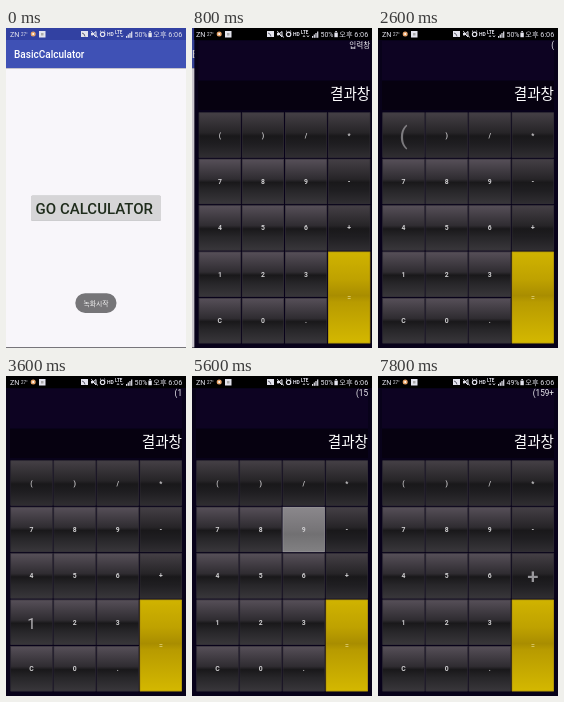
Recreate the animation shown at these times as an HTML page with a canvas. Size 180 by 320 pixels, loop 8000 ms.

```html
<!DOCTYPE html>
<html lang="ko">
<head>
<meta charset="utf-8">
<style>
html, body { margin: 0; width: 100%; height: 100%; overflow: hidden; background: #05020c; }
canvas { display: block; width: 100vw; height: 100vh; }
</style>
</head>
<body>
<canvas id="stage"></canvas>
<script>
const W = 180, H = 320, LOOP = 8000, STEP = 200;
const FONT = 'Roboto, "Noto Sans CJK KR", "Noto Sans CJK", sans-serif';
const canvas = document.getElementById('stage');
const ctx = canvas.getContext('2d');

const COL = 43.1, ROW = 46.4, LEFT = 4.5, TOP = 84.5;
const KEYS = ['()/*', '789-', '456+', '123=', 'C0.'];

// Each tap: key, press time, release time, input shown after release
const TAPS = [
  { key: '(', down: 1600, up: 2600, input: '(' },
  { key: '1', down: 3000, up: 3200, input: '(1', drop: 16 },
  { key: '5', down: 4400, up: 4800, input: '(15' },
  { key: '9', down: 5600, up: 6200, input: '(159', orbit: 15 },
  { key: '+', down: 7000, up: 7600, input: '(159+' }
];
const POP = 600;

function rect(x, y, w, h, fill) {
  ctx.fillStyle = fill;
  ctx.fillRect(x, y, w, h);
}

function pill(x, y, w, h, r, fill) {
  ctx.fillStyle = fill;
  ctx.beginPath();
  ctx.roundRect(x, y, w, h, r);
  ctx.fill();
}

function dot(x, y, r, fill) {
  ctx.fillStyle = fill;
  ctx.beginPath();
  ctx.arc(x, y, r, 0, 7);
  ctx.fill();
}

function line(points, color, width = 1) {
  ctx.strokeStyle = color;
  ctx.lineWidth = width;
  ctx.beginPath();
  points.forEach(([x, y]) => ctx.lineTo(x, y));
  ctx.stroke();
}

function text(str, x, y, size, color = '#fff', align = 'left', weight = 400) {
  ctx.font = `${weight} ${size}px ${FONT}`;
  ctx.textAlign = align;
  ctx.textBaseline = 'alphabetic';
  ctx.fillStyle = color;
  ctx.fillText(str, x, y);
}

function vertical(y, h, stops) {
  const g = ctx.createLinearGradient(0, y, 0, y + h);
  stops.forEach(([at, color]) => g.addColorStop(at, color));
  return g;
}

function drawStatus(t) {
  const c = '#e4e4ee';
  text('ZN', 4, 8.7, 7.2, c);
  text('27°', 15, 8, 4.5, c);
  dot(27.2, 6, 2.5, '#e8a46a');
  dot(27.2, 6, 1, '#fff');
  rect(33, 3, 6.5, 6.5, c);
  rect(35, 5, 2.5, 2.5, '#aaa');

  rect(75, 3, 7, 6, c);
  line([[76, 5], [78, 6], [79, 8.5]], '#445', .8);
  rect(85, 4.8, 2, 2.6, c);
  line([[87, 6], [90, 3.5], [90, 9], [87, 6]], c);
  line([[85, 3], [92, 9.5]], c, .8);
  ctx.beginPath();
  ctx.arc(96.6, 6.3, 2.2, 0, 7);
  ctx.lineWidth = 1.2;
  ctx.stroke();
  line([[94, 3.5], [95, 2.8]], c);
  line([[98.2, 2.8], [99.2, 3.5]], c);
  text('HD', 101, 8, 5, c, 'left', 700);
  text('LTE', 109, 6.2, 4.5, c, 'left', 700);
  line([[111, 9], [112, 7.5], [113, 9]], c, .8);
  line([[115, 7.5], [116, 9], [117, 7.5]], c, .8);
  for (let i = 0; i < 4; i++) rect(120 + i * 1.7, 8 - i * 1.5, 1.2, 1.8 + i * 1.5, c);
  text(t >= 6800 ? '49%' : '50%', 128.5, 8.7, 7, c);
  rect(142.4, 4.6, 3.4, 4.6, c);
  rect(143.3, 3, 1.6, 1.2, c);
  text('오후 6:06', 176.2, 8.8, 7.2, c, 'right');
}

function drawHome(t, shift) {
  ctx.save();
  ctx.translate(shift, 0);
  rect(0, 0, W + 10, 12, '#3241a2');
  rect(0, 12, W + 10, 28, '#3f51b5');
  rect(0, 40, W + 10, H - 40, '#f8f6fa');
  rect(0, 40, W + 10, 1, '#c4c2cc');
  rect(0, H - 1, W + 10, 1, '#77757a');
  text('BasicCalculator', 8, 30, 10, '#fff', 'left', 500);
  pill(25, 167.5, 130, 25.6, 1.5, '#c6c5c7');
  pill(25, 167.5, 130, 25, 1.5, t === 400 ? '#bcbbbd' : '#d6d5d7');
  text('GO CALCULATOR', 29.6, 186, 15, '#1f2c1c', 'left', 500);
  ctx.restore();
  const toast = Math.max(0, 1 - t / 400);
  if (toast) {
    ctx.globalAlpha = toast;
    pill(69.3, 265.2, 41.2, 19.8, 9.9, '#767578');
    text('녹화시작', 90, 277.5, 6.8, '#f4f4f4', 'center');
    ctx.globalAlpha = 1;
  }
}

function keyFill(label, row, col, y, h, pressed) {
  if (label === '=') return vertical(y, h, [[0, '#d0b300'], [.3, '#bfa200'], [.48, '#a98d00'], [.55, '#b89b00'], [1, '#d4b800']]);
  if (pressed) return vertical(y, h, [[0, '#8b888c'], [.5, '#777578'], [.6, '#717072'], [1, '#828183']]);
  const dark = row === 0 || col === 3;
  return vertical(y, h, [
    [0, dark ? '#454046' : '#575059'], [.45, dark ? '#262427' : '#2f2c31'],
    [.52, '#19181a'], [.7, dark ? '#1f1e21' : '#272629'], [1, dark ? '#302e32' : '#39373b']
  ]);
}

function drawKeys(t) {
  const popping = [];
  KEYS.forEach((row, r) => [...row].forEach((label, c) => {
    const x = LEFT + c * COL, y = TOP + r * ROW;
    const w = COL - 1, h = (label === '=' ? 2 * ROW : ROW) - 1.2;
    const tap = TAPS.find(k => k.key === label);
    const pressed = tap && t >= tap.down && t < tap.up;
    const pop = tap && t >= tap.up && t < tap.up + POP;
    rect(x, y, w, h, keyFill(label, r, c, y, h, pressed));
    ctx.strokeStyle = label === '=' ? '#a58a10' : pressed ? '#99979a' : '#322e36';
    ctx.lineWidth = .5;
    ctx.strokeRect(x + .3, y + .3, w - .6, h - .6);
    const cx = x + w / 2, cy = y + h / 2;
    if (pop) popping.push({ tap, cx, cy });
    if (!pop || tap.orbit)
      text(label, cx, cy + 2.5, 6.8, label === '=' ? '#dccb70' : '#cfced0', 'center', 700);
  }));
  popping.forEach(p => drawPop(p, t));
}

// Released labels shrink and fade in; some also drop or circle a point above the key
function drawPop({ tap, cx, cy }, t) {
  const done = (t - tap.up) / POP, left = 1 - done;
  const scale = 1 + (tap.orbit ? 3.6 : 2.5) * left ** .7;
  const orbit = tap.orbit || 0;
  ctx.save();
  ctx.translate(cx, cy - orbit + (tap.drop || 0) * left ** 2);
  if (orbit) ctx.rotate(done * 2 * Math.PI);
  ctx.translate(0, orbit);
  ctx.scale(scale, scale);
  text(tap.key, 0, 2.5, 7, `rgba(215,213,217,${.5 + .5 * done})`, 'center', tap.key === '+' ? 500 : 400);
  ctx.restore();
}

function drawCalculator(t, x) {
  ctx.save();
  ctx.translate(x, 0);
  rect(0, 0, W, H, '#08021a');
  rect(0, 0, W, 12, '#000');
  rect(4, 13, 172, 39, '#0d0322');
  rect(4, 53, 172, 29, '#060110');
  const last = TAPS.filter(k => t >= k.up).pop();
  text(last ? last.input : '입력창', 176, 20.3, last ? 8.2 : 7.6, '#ececf0', 'right');
  text('결과창', 176, 71.2, 14.6, '#fff', 'right');
  drawKeys(t);
  ctx.restore();
}

function draw(t) {
  const slide = t < 600 ? W : t < 800 ? 100 : t < 1000 ? 2.3 : 0;
  if (slide) {
    drawHome(t, slide === W ? 0 : slide > 50 ? -2 : -8);
    if (slide < W) rect(0, 0, slide, H, `rgba(20,14,30,${slide > 50 ? .06 : .2})`);
  }
  if (slide < W) drawCalculator(t, slide);
  drawStatus(t);
}

function frame() {
  const ratio = devicePixelRatio || 1;
  const w = Math.round(innerWidth * ratio), h = Math.round(innerHeight * ratio);
  if (canvas.width !== w || canvas.height !== h) {
    canvas.width = w;
    canvas.height = h;
  }
  ctx.setTransform(w / W, 0, 0, h / H, 0, 0);
  const elapsed = (performance.now() - start) % LOOP;
  draw(Math.floor(elapsed / STEP) * STEP);
  requestAnimationFrame(frame);
}

const start = performance.now();
frame();
</script>
</body>
</html>
```
